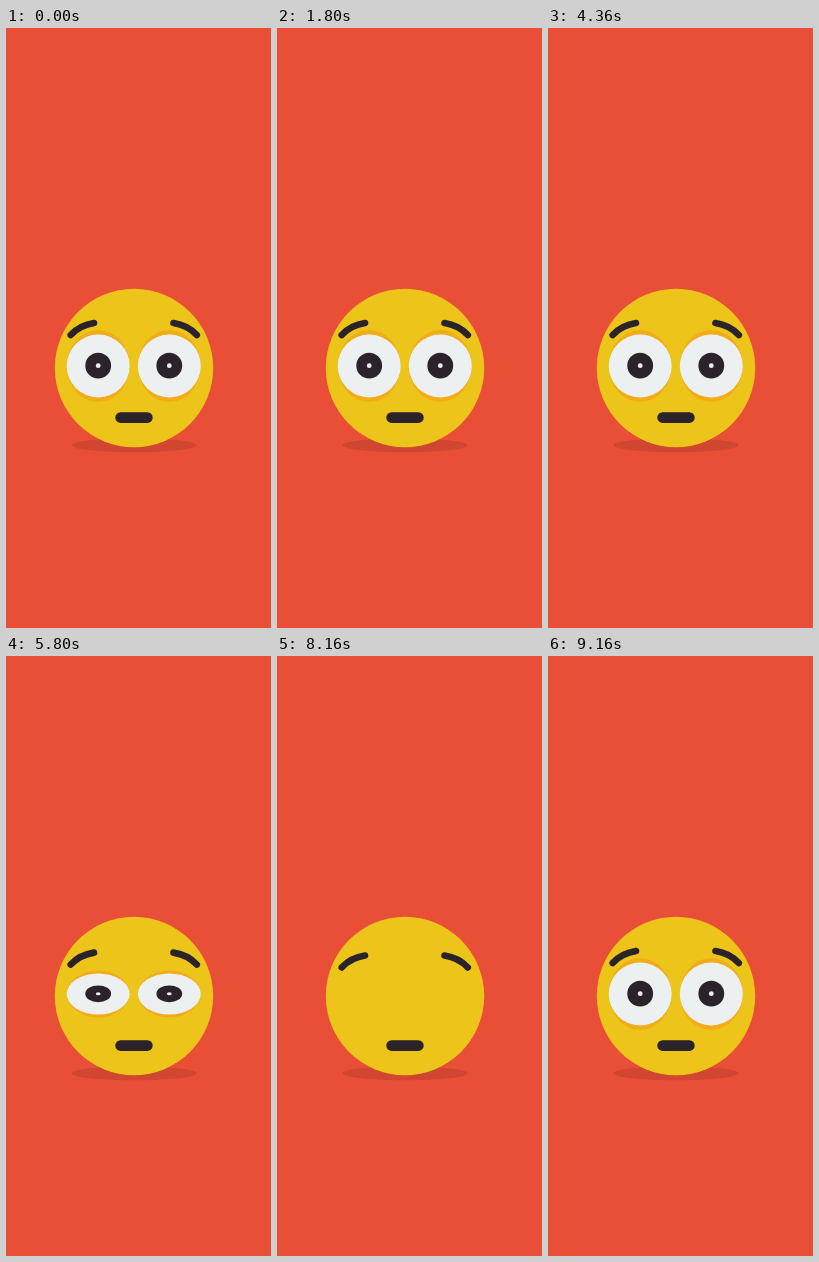
Animation, 265 px wide and 600 px high, one loop 9600 ms. Source, as an HTML page:

```html
<!DOCTYPE html>
<html lang="en">
<head>
<meta charset="utf-8">
<title>Blinking face</title>
<style>
  html, body { margin: 0; width: 100%; height: 100%; overflow: hidden; background: #e94e36; }
  svg { display: block; width: 100%; height: 100%; }
</style>
</head>
<body>
<svg viewBox="0 0 265 600">
  <defs>
    <g id="eye">
      <ellipse rx="31.4" ry="36" fill="#f1ac18"/>
      <circle r="31.5" fill="#ecf0f1"/>
      <circle r="12.9" cy="-.3" fill="#2a2329"/>
      <circle r="2.4" cy="-.3" fill="#ecf0f1"/>
    </g>
    <path id="brow" d="M64.7 307Q74 297.2 88 295.1" fill="none" stroke="#2a2329" stroke-width="6.6" stroke-linecap="round"/>
  </defs>
  <ellipse cx="128" cy="417.3" rx="62.5" ry="7" fill="#d04631"/>
  <circle cx="128" cy="340" r="79.2" fill="#edc41a"/>
  <rect x="109.3" y="384.3" width="37.4" height="10.6" rx="5.3" fill="#2a2329"/>
  <use class="eye" href="#eye" data-x="92.2"/>
  <use class="eye" href="#eye" data-x="163.3"/>
  <g id="brows">
    <use href="#brow"/>
    <use href="#brow" transform="translate(255.5) scale(-1 1)"/>
  </g>
</svg>
<script>
  const CYCLE = 4800, HALF_BLINK = 1000 / 3, BROW_DROP = 4.4;
  const STARTS = [1400 / 3, 9080 / 3]; // each start triggers a double blink
  const eyes = document.querySelectorAll('.eye');
  const brows = document.getElementById('brows');
  const smooth = u => u * u * (3 - 2 * u);

  // 0 = eyes open, 1 = eyes shut
  function closure(t) {
    for (const start of STARTS) {
      const p = (t - start) / HALF_BLINK;
      if (p > 0 && p < 4) return smooth(1 - Math.abs(p % 2 - 1));
    }
    return 0;
  }

  function draw(now) {
    const shut = closure(now % CYCLE);
    for (const eye of eyes) {
      eye.setAttribute('transform', `translate(${eye.dataset.x} 338) scale(1 ${1 - shut})`);
      eye.setAttribute('visibility', shut > 0.998 ? 'hidden' : 'visible');
    }
    brows.setAttribute('transform', `translate(0 ${BROW_DROP * shut})`);
  }

  function tick() {
    draw(performance.now());
    requestAnimationFrame(tick);
  }
  tick();
</script>
</body>
</html>
```
